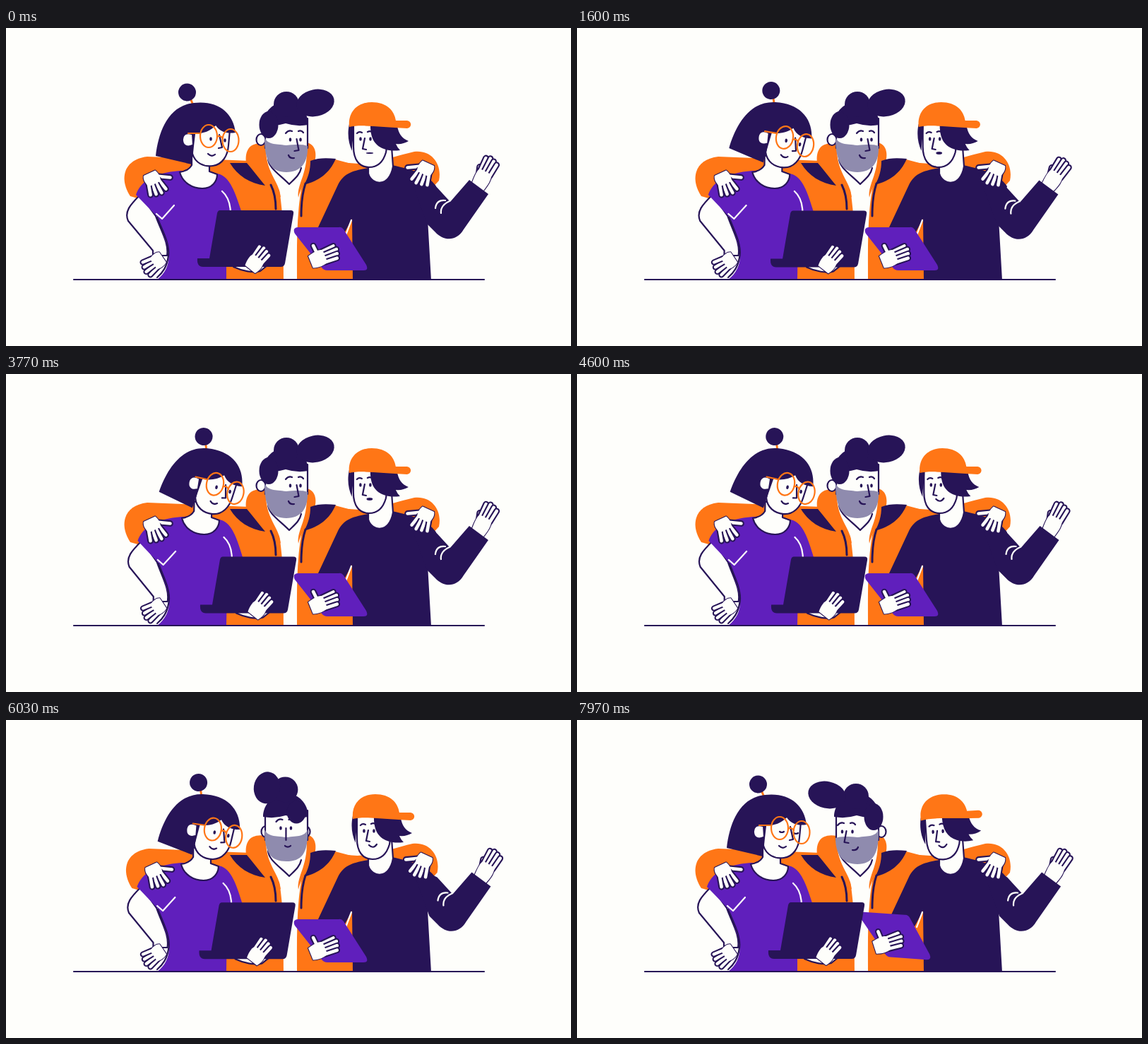
These frames come from a looping animation (800 by 450 pixels, 8 s). An HTML page:

```html
<!DOCTYPE html>
<html lang="en">
<head>
<meta charset="utf-8">
<title>Three friends</title>
<style>
html, body { margin: 0; width: 100%; height: 100%; overflow: hidden; background: #fefefb; }
svg { display: block; width: 100vw; height: 100vh; --navy: #271457; --skin: #fefefb; --orange: #ff7616; }
.n { fill: var(--navy); }
.o { fill: var(--orange); }
.p { fill: #601fbc; }
.w { fill: var(--skin); }
.g { fill: #8f8bae; }
.line, .skin, .light, .rim, .edge, .flesh { fill: none; stroke-width: 2.2; stroke-linecap: round; stroke-linejoin: round; }
.line, .skin, .edge { stroke: var(--navy); }
.skin { fill: var(--skin); }
.light, .flesh { stroke: var(--skin); }
.rim { stroke: var(--orange); }
.edge { stroke-width: 8.8; }
.flesh { stroke-width: 4.6; }
.thick { stroke-width: 3; }
</style>
</head>
<body>
<svg viewBox="0 0 800 450" id="stage"></svg>
<script>
const path = (cls, d, id = '') => `<path class="${cls}" d="${d}" ${id && `id="${id}"`}/>`;
const oval = (cls, x, y, rx, ry, id = '') =>
  `<ellipse class="${cls}" cx="${x}" cy="${y}" rx="${rx}" ry="${ry}" ${id && `id="${id}"`}/>`;
const group = (id, ...parts) => `<g id="${id}">${parts.join('')}</g>`;
const eyes = (x1, x2, y, y2 = y) => oval('n', x1, y, 1.8, 2.8) + oval('n', x2, y2, 1.8, 2.8);

// A palm with four fanned fingers pointing along `angle`, melted into one outline.
function hand(x, y, angle, { thumb = '', wrist = 14, fan = 1.15, reach = 19, scale = 1 } = {}) {
  const palm = `M${-wrist} -9C-8 -12 0 -12 3 -9V9C-4 12 -10 12 ${-wrist} 9Z`;
  const fingers = [0, 1, 2, 3].map(i => {
    const base = (i - 1.5) * 5.2;
    return `M0 ${base}L${reach - 2.4 * Math.abs(i - 1.2)} ${base * fan}`;
  });
  if (thumb) fingers.unshift(`M-6 -7L${thumb}`);
  return `<g transform="translate(${x} ${y}) rotate(${angle}) scale(${scale})">` +
    path('skin', palm) + fingers.map(d => path('edge', d) + path('flesh', d)).join('') +
    path('w', palm) + '</g>';
}

const restingHand = hand(209, 218, 65, { thumb: '4 -24', fan: 1.5 });

const coat =
  path('o', 'M338 188L318 190L300 205L312 357H492L500 195L466 186L436 188L400 240Z') +
  path('w', 'M370 188C388 215 393 235 393 357H412C412 300 410 240 428 190Z') +
  path('o', 'M368 164C346 160 338 172 340 190C352 212 376 222 389 240C387 215 366 205 368 164Z') +
  path('o', 'M425 162C440 164 441 182 435 195C430 208 420 218 414 240C411 220 430 205 425 162Z') +
  path('skin', 'M371 185C372 198 386 206 401 221C408 214 416 208 418 198') +
  path('n', 'M317 191H341C350 202 358 212 367 223C345 220 328 209 317 191Z') +
  path('n', 'M431 188C443 183 456 184 467 185C458 206 443 216 422 222C428 211 431 201 431 188Z') +
  path('line thick', 'M375 222C380 232 382 243 382 256M424 220C419 235 418 250 418 266');

const manHead = group('manHead',
  oval('skin', 361, 158, 6.5, 8, 'earL'), oval('skin', 431, 158, 6.5, 8, 'earR'),
  path('skin', 'M367 128V170H427V128Z'), path('g', '', 'beard'),
  group('manEyes', eyes(402.5, 417, 158),
    path('line', 'M396 149Q400 144 405 146M414 146Q418 144 421 148')),
  path('line', '', 'nose'), path('line', '', 'manMouth'),
  path('n', 'M364 137C364 118 380 104 397 104C414 104 428 118 428 137Q412 140 396 135Q380 140 364 137Z'),
  oval('n', 0, 0, 18, 18, 'crown'), oval('n', 0, 0, 1, 1, 'tuft'), oval('n', 0, 0, 1, 1, 'quiff'));

const womanBody = group('womanBody',
  path('skin', 'M190 236C176 250 167 260 173 273L208 315V322L228 322C231 305 220 288 212 266Z'),
  hand(211, 332, 145, { fan: 1.4, scale: .95 }),
  path('p', 'M184 236C190 218 208 205 246 202L299 206C316 209 324 230 334 262L312 300V356H214C229 345 234 326 228 308L215 268Z'),
  path('light', 'M213 263L221 270L238 251M306 231C314 238 318 250 318 263'),
  path('line', 'M214 268C222 288 232 306 230 322C228 338 222 346 214 353'),
  path('skin', 'M263 180V194C259 201 253 203 246 204C250 219 264 227 278 227C292 227 299 217 299 207L288 203V190Z'));

const womanHead = group('womanHead',
  group('bun', path('rim thick', 'M261 99L264 107'), oval('n', 256.5, 91, 12.5, 12.5)),
  path('skin', 'M264 148V178C268 191 280 197 293 195C307 193 314 180 315 166L317 144L285 128Z'),
  path('n', 'M212 181C216 146 230 110 266 106C300 102 322 120 325 148C313 150 303 147 297 138C289 146 280 149 268 150L263 193Z'),
  path('skin', 'M263 150C253 147 249 153 250 160C251 168 258 169 264 166'),
  path('line', 'M302 151L306 169L301 170M286 178Q291 183 296 179'),
  group('womanEyes', eyes(290, 310, 157, 159)),
  path('line', 'M287 158Q290 160 293 158M307 160Q310 162 313 160', 'womanLids'),
  oval('rim', 287, 153, 12, 16), oval('rim', 318, 159, 11.5, 16),
  path('rim', 'M258 149H274M299 154Q303 151 307 156'));

const laptop = group('laptop',
  path('skin', 'M322 338C335 344 350 347 360 344L370 336L350 325Z'),
  path('n', 'M303 258H403Q408 258 407 263L395 333Q394 338 389 338H279Q270 338 271 326H288L299 262Q300 258 303 258Z'),
  hand(356, 328, -52, { wrist: 17 }));

const tablet = group('tablet',
  path('p', 'M413 282H471Q475 281 478 285L510 335Q514 343 506 343H455Q450 343 447 339L409 291Q405 283 413 282Z'),
  hand(449, 324, -22, { thumb: '-7 -20', wrist: 19, reach: 22 }));

const teen =
  path('n', 'M513 198C490 202 478 206 470 222L441 284L478 292L490 270L491 357H602L597 270L609 224C598 208 582 202 547 194Z') +
  path('light', 'M489 272L481 293') +
  group('arm',
    group('wave', hand(678, 206, -62, { thumb: '5 -11', wrist: 26, reach: 23 })),
    path('n', 'M570 205L607 222L629 246L656 215L683 235L648 285C638 302 620 302 608 289L596 277Z'),
    path('light', 'M608 255C609 247 614 243 622 244M616 262C615 254 619 249 628 245')) +
  path('skin', 'M513 192V206C518 223 543 226 548 196L546 168H525Z') +
  group('teenHead',
    path('skin', 'M492 136V168C492 186 500 197 514 197C526 197 534 190 538 176L542 150L530 134Z'),
    path('n', 'M486 136C483 151 485 163 490 174C490 161 493 150 493 138ZM516 138C516 154 521 166 535 171C543 174 550 174 558 173Q554 169 552 164Q562 165 570 160C560 156 556 149 554 139Z'),
    path('o', 'M486 140C484 117 499 105 518 105C539 105 550 117 552 131H568C575 132 575 141 568 142C550 141 535 140 520 139C506 138 495 138 486 140Z'),
    eyes(502, 516, 157),
    path('line', 'M497 149Q500 146 504 148M512 147Q516 145 519 148M508 156L505 171L510 172'),
    oval('n', 515, 177, 4, 1, 'talk'), path('line', 'M509 177Q515 183 520 176', 'smile'));

const stage = document.getElementById('stage');
stage.innerHTML =
  group('armL', path('o', 'M345 188L200 182C166 186 160 214 176 238L190 242L300 230L345 215Z')) +
  group('armR', path('o', 'M440 188L500 192C530 190 555 180 578 175C602 172 618 192 613 216L600 230L480 225Z')) +
  coat + manHead + womanBody + womanHead + teen +
  group('handL', restingHand) +
  group('handR', `<g transform="matrix(-1 0 0 1 801 -14)">${restingHand}</g>`) +
  tablet + laptop + path('line', 'M96 356H677');

const el = {};
stage.querySelectorAll('[id]').forEach(node => el[node.id] = node);

const pose = (node, value) => node.setAttribute('transform', value);
const show = (node, visible) => node.style.display = visible ? '' : 'none';
const shape = (node, attributes) => {
  for (const name in attributes) node.setAttribute(name, attributes[name]);
};

const ease = (t, from, to) => {
  const k = Math.min(1, Math.max(0, (t - from) / (to - from)));
  return k * k * (3 - 2 * k);
};
const bump = (t, center, width) => Math.exp(-(((t - center) / width) ** 2));
const wobble = (t, center) =>
  Math.exp(-Math.abs(t - center) / 450) * Math.cos((t - center) * 2 * Math.PI / 1100);

function drawWoman(t) {
  const lean = ease(t, 500, 2100) - ease(t, 5650, 6600);
  const blink = Math.abs(t - 2530) < 80 || t > 7900;
  pose(el.womanHead, `rotate(${12.6 * lean} 279 195)`);
  pose(el.bun, `rotate(${24 * wobble(t, 2530) - 14 * wobble(t, 6600)} 264 106)`);
  pose(el.womanBody, `matrix(1 0 ${-.02 * lean} 1 ${7.1 * lean} 0)`);
  pose(el.laptop, `translate(${4 * lean} ${.5 * lean})`);
  show(el.womanEyes, !blink);
  show(el.womanLids, blink);
}

// `side` runs from 1 (facing right) to -1 (facing left); the hair swings ahead of it.
function drawMan(t) {
  const side = 1 - 2 * ease(t, 5450, 6610);
  const swing = 1 - 2 * ease(t, 5450, 6250);
  const front = 1 - Math.abs(side), lift = 1 - swing * swing;
  const nod = 2 * bump(t, 5270, 250);
  pose(el.manHead, `translate(${nod} ${nod})`);

  shape(el.quiff, {
    rx: 27 - 14 * lift, ry: 19 + 6 * lift,
    transform: `translate(${396 + 42 * swing} ${106 - 17 * lift}) rotate(${-12 * swing})`
  });
  shape(el.crown, { cx: 396 + swing, cy: 108 - 16 * lift });
  shape(el.tuft, { cx: 396 - 24 * swing, cy: 137 - 11 * lift, rx: 13.5, ry: 19 - 5 * lift });

  const leftY = 155 + 12 * Math.max(0, -side), rightY = 155 + 12 * Math.max(0, side);
  const chin = 204 - 4 * front;
  shape(el.beard, {
    d: `M366 ${leftY}C371 165 380 164 397 166C414 164 423 165 427 ${rightY}` +
       `C428 190 418 ${chin} 397 ${chin}C376 ${chin} 366 190 366 ${leftY}Z`
  });
  shape(el.earL, { cx: 368 - 7 * side });
  shape(el.earR, { cx: 424 - 7 * side });

  pose(el.manEyes, `translate(${13.5 * (side - 1)} ${-5 * front})`);
  shape(el.nose, { d: `M${396.5 + 15 * side} ${157 - 4 * front}l${3 * side} 16l${-6 * side} 1` });
  const mouthX = 399 + 5 * side, mouthY = 182 - 4 * front;
  shape(el.manMouth, {
    d: `M${mouthX - 4} ${mouthY - 2 * side}Q${mouthX - 2 * side} ${mouthY + 3} ${mouthX + 4} ${mouthY + 2 * side}`
  });

  for (const node of [el.armL, el.handL]) pose(node, `translate(${2.4 * front} 0)`);
  for (const node of [el.armR, el.handR]) pose(node, `translate(${-2.4 * front} 0)`);
}

function drawTeen(t) {
  const drift = bump(t, 2150, 900), perk = ease(t, 5350, 5950), settle = ease(t, 6300, 7200);
  const sway = -3.4 * drift - 3 * bump(t, 5150, 450) + 5 * perk - 2 * settle;
  pose(el.teenHead, `translate(${sway} 0) rotate(${-4 * settle} 520 170)`);
  pose(el.arm, `translate(${.7 * sway} ${.8 * drift + .5 * perk})`);
  pose(el.wave, `rotate(${9 * drift + 3 * perk} 668 226)`);

  const open = 2.2 - 1.2 * Math.cos(t * 2 * Math.PI / 723);
  shape(el.talk, { rx: 6 - .85 * open, ry: open });
  show(el.talk, t < 4300);
  show(el.smile, t >= 4300);

  const slide = ease(t, 6650, 7450);
  pose(el.tablet, `translate(${-9 * slide} ${-7 * slide}) rotate(${4 * slide} 460 312)`);
}

const started = performance.now();
function tick() {
  const t = (performance.now() - started) % 8000;
  drawWoman(t);
  drawMan(t);
  drawTeen(t);
  requestAnimationFrame(tick);
}
tick();
</script>
</body>
</html>
```
